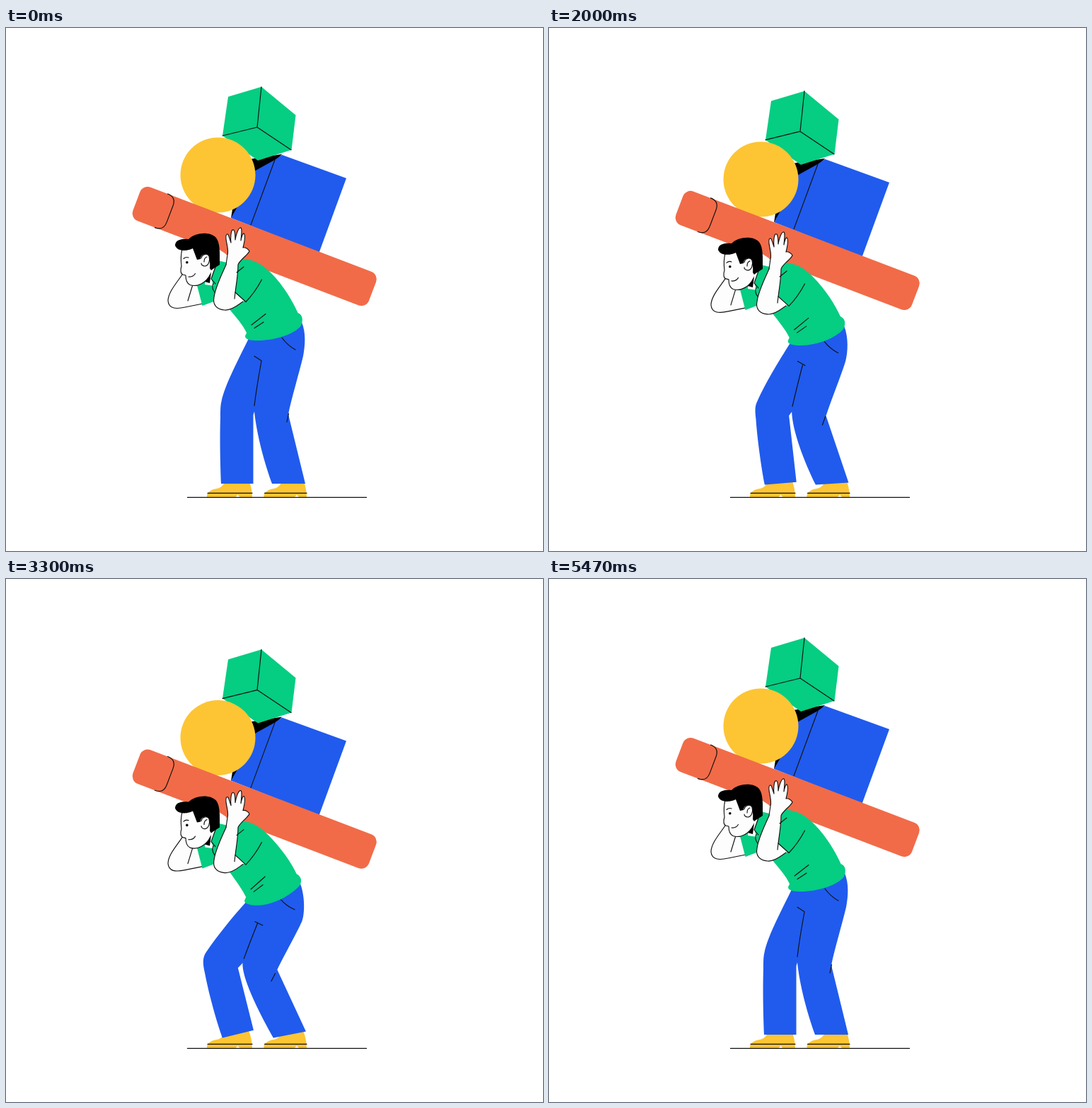
An HTML page with a canvas that plays this animation: 759x738 px, repeating every 5.51 s.

```html
<!DOCTYPE html>
<html lang="en">
<head>
<meta charset="utf-8">
<title>Heavy load</title>
<style>
html, body { margin: 0; width: 100%; height: 100%; overflow: hidden; background: #fff; }
canvas { display: block; width: 759px; height: 738px; }
</style>
</head>
<body>
<canvas id="stage"></canvas>
<script>
const W = 759, H = 738, LOOP = 5510, CYCLE = LOOP / 2;
const GREEN = '#05cd82', BLUE = '#205bee', RED = '#f16b48', YELLOW = '#fdc534', INK = '#111', WHITE = '#fdfdfd';
const DROP = 18.6;
const SINK_END = 780, RISE_START = 1330, RISE_END = 2110, LAND = 2705, HOP = 10;

const canvas = document.getElementById('stage');
const ctx = canvas.getContext('2d');
const ratio = window.devicePixelRatio || 1;
canvas.width = W * ratio;
canvas.height = H * ratio;

// Paths for the standing and the crouching pose, blended point by point.
const LEFT_LEG = [
  'M343 438 C330 465 309 504 304.5 527 C303 533 303 540 303 550 C302 580 303 620 304 643 L349.5 643 L349.5 546 L351 541 L400 500 L400 430 Z',
  'M338 459 C318 480 299 502 282 525 C275 534 276 543 279 556 C285 585 297 625 306 648 L350 636 L326 549 L334 541 L382 500 L400 450 Z'
];
const RIGHT_LEG = [
  'M400 420 L360 436 L351 541 C354 572 365 613 376 643 L423 643 L399 545 C404 521 414 488 420 463 C423 447 424 430 418 415 Z',
  'M400 440 L360 456 L333 541 C331 560 354 606 378 648 L424 638 L382 552 C393 531 410 502 418 486 C422 477 423 452 416 432 Z'
];
const LEG_LINES = [
  'M351 463 L361 469.5 M361 470 Q354 508 351 533 M390 437 Q398 448 409 454 M399.5 544 L397 556',
  'M352 486 L363 491 M355 488 Q344 513 335 536 M388 454 Q397 464 408 468 M379 558 L373 569'
];
const SHIRT = [
  'M299 328 L312 331 L330 326 C345 324 361 332 374 345 C393 364 406 387 412.5 402 C420 405 420 413 417 420 C408 432 380 441 356 441 C347 441 338 440 338 435 C338 433 340 432 340 430 C335 419 325 408 316 397 L296 372 L290 353 Z',
  'M299 346.6 L312 349.6 L330 344.6 C345 342 358 351 370 363 C389 382 403 402 410.5 418 C418 422 418 429 415 434 C402 448 378 462 356 463 C346 463 337 461 337 457 C337 454 339 453 339 451 C334 441 325 428 316 415.6 L296 390.6 L290 371.6 Z'
];
const FOLDS = [
  'M347 419 L367 403.5 M351 423.5 L364 415',
  'M346 440 L366 422 M350 443.5 L363 433.5'
];

const HAIR = 'M239 307 C239 299 248 297 258 298 C268 288 289 287 297 296 C303 304 302 318 302 334 C298 337 293 339 290 342 L288 339 C289 330 287 321 282 319 C278 319 275 322 275 326 L270 327 L264 311 C259 314 243 317 239 307 Z';
const FACE_LINE = 'M249 312 C247 320 247 328 248 336 C246 342 247 347 250 348 L254 349 C254 354 255 360 260 362.5 C270 366 283 360 289 347';
const FACE = FACE_LINE + ' L291 335 L282 310 L262 306 Z';
const EAR = 'M276 325 C277 319 285 317 287 322 C289 328 286 336 281 336 C278 336 276 334 276 332';
const ELBOW = 'M249 348 C241 360 229 373 229 385 C230 396 240 397 253 394 L278 389';
const HAND = 'M311 334 L313 320 C315 314 312 306 311 298 C310 290 314 289 315 294 L318 303 C317 296 318 287 320 285 C323 283 324 290 324 299 C325 292 328 283 331 282 C334 281 333 290 332 300 C333 294 335 289 336 290 C339 292 337 302 335 310 C338 309 343 312 344 315 C342 319 338 322 335 325 C332 328 329 331 328 334';
const FOREARM = ' C328 350 325 362 324 373 L337 385 C330 389 320 399 309 398 C297 397 292 390 294 380 C296 365 305 348 311 334 Z';

function mix([a, b], kx, ky) {
  const end = b.match(/[\d.]+/g);
  let i = 0;
  return a.replace(/[\d.]+/g, n => {
    const k = i % 2 ? ky : kx;
    return +n + (end[i++] - n) * k;
  });
}

function fill(d, color) {
  ctx.fillStyle = color;
  ctx.fill(new Path2D(d));
}

function line(d, width = 1.15) {
  ctx.strokeStyle = INK;
  ctx.lineWidth = width;
  ctx.stroke(new Path2D(d));
}

function disc(x, y, r, color) {
  ctx.fillStyle = color;
  ctx.beginPath();
  ctx.arc(x, y, r, 0, Math.PI * 2);
  ctx.fill();
}

function shifted(dy, draw) {
  ctx.save();
  ctx.translate(0, dy);
  draw();
  ctx.restore();
}

function drawBar() {
  ctx.save();
  ctx.translate(351.2, 308);
  ctx.rotate(Math.atan(0.381));
  ctx.fillStyle = RED;
  ctx.beginPath();
  ctx.roundRect(-178.5, -25.5, 357, 51, 11.5);
  ctx.fill();
  line('M-141 -25.5 Q-128 -25.5 -128 -12.5 L-128 12.5 Q-128 25.5 -141 25.5');
  ctx.restore();
}

function drawLoad() {
  fill('M390 178 L345 185 L320 256 L318 268 L332 262 L381 188 Z', '#000');
  fill('M380 186 L351 202 L326 254 L318 268 L346 279 Z', BLUE);
  fill('M390 179 L481 212 L442.5 317 L346 279 L380 186 Z', BLUE);
  line('M380 186 L346 278');
  fill('M314 97 L361 83 L409.5 123 L403.5 172 L356 187 L306 152 Z', GREEN);
  line('M361 83 L355 140 L306 152 M355 140 L403 172');
  disc(299.5, 207.5, 53, YELLOW);
  drawBar();
}

function drawShoe(toe, notch, heel) {
  fill(`M${toe} 662 C${toe - 1} 655 ${toe + 6} 651 ${toe + 16} 649.5 C${toe + 20} 648 ${toe + 22} 646 ${toe + 24} 643 L${heel - 5} 637 C${heel - 2} 645 ${heel} 653 ${heel} 662 L${notch + 3} 662 L${notch} 658.5 L${notch - 3} 662 Z`, YELLOW);
  line(`M${toe + 1} 656.3 H${heel}`, 1.2);
}

function drawLegs(u) {
  const bend = Math.pow(u, 0.72);
  drawShoe(284, 327.5, 348);
  drawShoe(364.5, 411, 425);
  fill(mix(LEFT_LEG, bend, u), BLUE);
  fill(mix(RIGHT_LEG, bend, u), BLUE);
  line(mix(LEG_LINES, bend, u));
  line('M256.5 662.4 H509.5', 1.3);
}

function drawHead() {
  fill(FACE, WHITE);
  line(FACE_LINE);
  fill(HAIR, '#000');
  fill(EAR, WHITE);
  line(EAR + ' M280 330 Q280 324 284 323');
  disc(255.8, 330.8, 1.8, '#000');
  line('M251 325.5 Q254 322.5 258 324 M258 351 Q264 352 267.5 346.5');
}

function drawArm() {
  fill(HAND + FOREARM, WHITE);
  line(HAND + ' C328 350 325 362 323 382');
  line('M335 386 C330 389 320 399 309 398 C297 397 292 390 294 380 C296 365 305 348 311 334');
  line('M361.5 355 Q352 373 339 386.5 L324 373 M336 337 L326 345');
}

function drawBody(u) {
  const dy = DROP * u;
  shifted(dy, () => {
    fill('M299 311 L311 319 L314 331 L296 335 Z', WHITE);
    fill(ELBOW + ' L272 360 Z', WHITE);
    line(ELBOW + ' M264 362 L257 385');
    fill('M270 363 L277.5 392 L296 385 L297 350 Z', GREEN);
    fill('M284 340 L296 332 L295 364 L281 362 Z', WHITE);
  });
  fill(mix(SHIRT, u, u), GREEN);
  line(mix(FOLDS, u, u));
  shifted(dy, () => {
    fill('M281 358 L290 344 L288 360 Z', '#000');
    line('M299 329 L290 354 L296 361 M293 360 Q290 367 295 373');
    drawHead();
    drawArm();
  });
}

function easeInOut(s) {
  return s < 0.5 ? 4 * s ** 3 : 1 - 4 * (1 - s) ** 3;
}

function crouch(t) {
  if (t < SINK_END) return easeInOut(t / SINK_END);
  if (t < RISE_START) return 1;
  if (t < RISE_END) return 1 - Math.pow((t - RISE_START) / (RISE_END - RISE_START), 2.55);
  return 0;
}

// The load leaves the shoulders when he straightens up and falls back.
function hop(t) {
  if (t < RISE_END || t > LAND) return 0;
  const s = (t - RISE_END) / (LAND - RISE_END);
  return HOP * 4 * s * (1 - s);
}

function render(now) {
  const t = (now % LOOP) % CYCLE;
  const u = crouch(t);
  ctx.setTransform(ratio, 0, 0, ratio, 0, 0);
  ctx.fillStyle = '#fff';
  ctx.fillRect(0, 0, W, H);
  ctx.lineCap = ctx.lineJoin = 'round';
  shifted(DROP * u - hop(t), drawLoad);
  drawLegs(u);
  drawBody(u);
}

const start = performance.now();
function tick() {
  render(performance.now() - start);
  requestAnimationFrame(tick);
}
tick();
</script>
</body>
</html>
```
